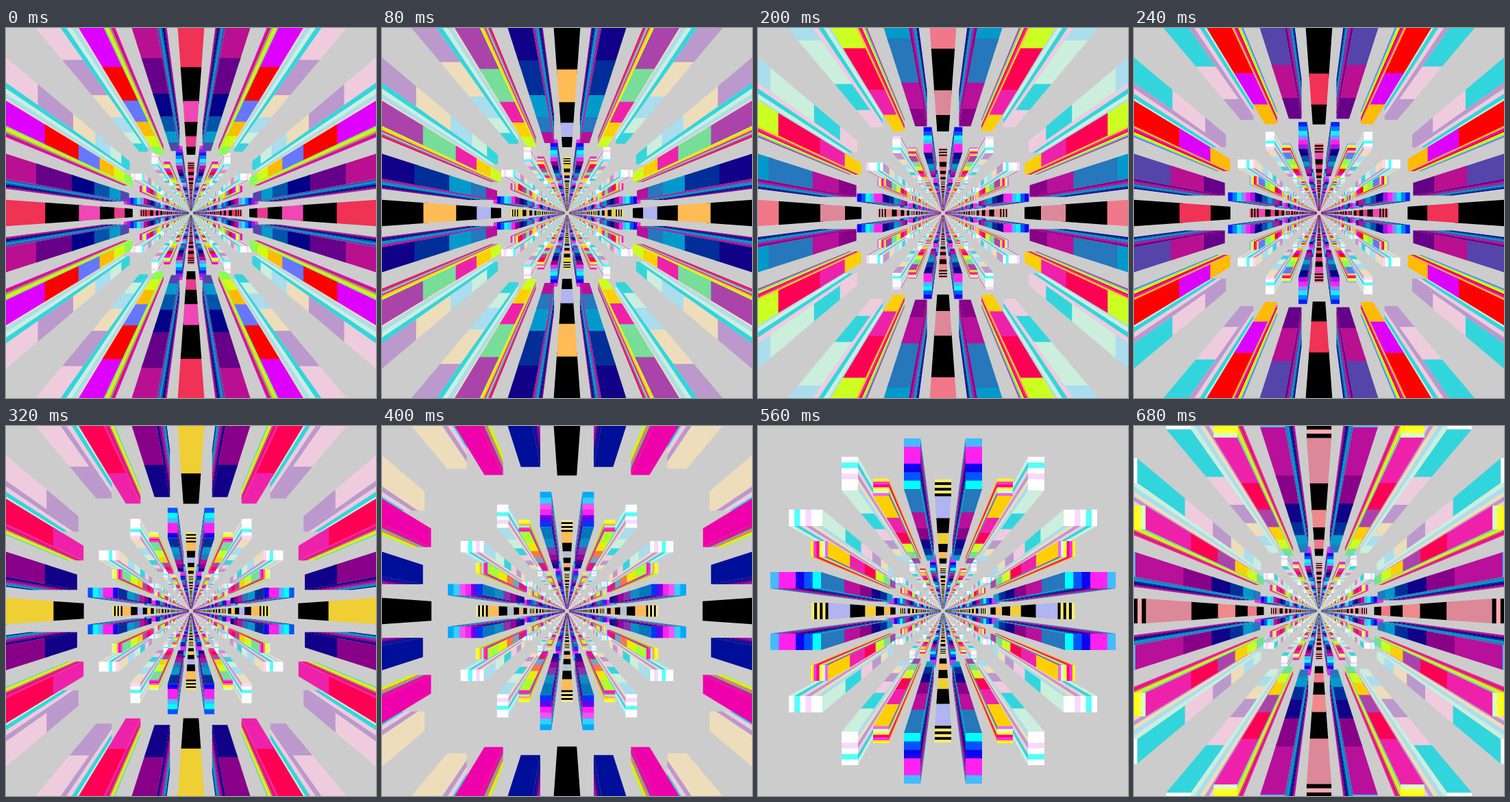
An HTML page with a canvas that plays this animation: 540x540 px, repeating every 720 ms.

```html
<!DOCTYPE html>
<html lang="en">
<head>
<meta charset="utf-8">
<title>Bar tunnel</title>
<style>
  html, body { margin: 0; width: 100%; height: 100%; overflow: hidden; background: #ccc; }
  canvas { display: block; width: 540px; height: 540px; }
</style>
</head>
<body>
<canvas id="stage" width="540" height="540"></canvas>
<script>
const ctx = document.getElementById('stage').getContext('2d');

const STEP = 40, STEPS = 18;   // ms per step, steps per loop
const PERIOD = 2.02;           // depth between rings
const CELL = 0.2363;           // depth of one colour cell
const RINGS = 26;
const NEAR = 0.2;
const LAP = 0.1;               // share by which pieces run under the next one

const list = s => s.split(' ').map(c => '#' + c);
const LINEAR = [0, 3, 6, 9, 12, 15];
const SWAPPED = [0, 3, 6, 15, 12, 9];

// r, R: inner and outer radius; a, b: inner and outer lateral offset
const bars = [
  {
    r: 176, R: 225, a: 124, b: 148, order: LINEAR,
    body: list('eeccdd bb99cc eeddbb aaddee cceedd 33d5dd'),
    cap: list('ffffff f8d8fc ffffff ffffff ffffff 55ffff')
  },
  {
    r: 168, R: 193, a: 79, b: 102, order: SWAPPED,
    body: list('dd00ff ee00aa ff0055 ff0000 d0226a aa44aa 6677ff 66aacc 77dd99 ' +
               '88ff55 aaff33 ccff22 d0ff11 ecec00 fcd000 ffbb00 ff7744 ee22aa'),
    cap: list('ff00ff ff00dd ff0088 ff0033 ff3388 ee66ee 99aaff 99eeee d8ffc8 ' +
              'c8ff77 f0ff44 ffff33 ffff11 ffff00 ffff00 ffee00 ffaa55 ff33dd')
  },
  {
    r: 178, R: 252, a: 33, b: 57, order: LINEAR,
    body: list('b81090 990099 880088 660088 440088 110088 000088 000f99 002e99 ' +
               '0055aa 0077bb 0099cc 0099cc 118bc4 2677bb 5544aa 8833aa b8109a'),
    cap: list('ff22ee ff22ee ff22ee aa11ee 6600ee 1100ee 0022f4 0033fa 0055ff ' +
              '0080ff 00aaff 00ffff 11eeff 33d0ff 44bbff 8888ff ee55f4 ff22ee')
  },
  {
    r: 167.5, R: 192, a: -12, b: 12, order: LINEAR, central: true,
    body: list('f03255 f0863c efcf33 efc060 efae70 ee8a8a f047b4 f58078 ffbb55 ' +
               'fca860 ffbb55 f07888 e63c8c d080c8 b0b4f0 b0b8e0 b4c0d0 dd8899'),
    cap: list('ff5577 ff9966 ffee66 ffe070 ffee99 ffaab0 '.repeat(3).trim())
  }
];

function shade(bar, palette, n, k) {
  if (bar.central && k % 2) return '#000';
  const m = (n + bar.order[k]) % STEPS;
  return palette[Math.floor(m * palette.length / STEPS)];
}

// Points are [lateral, radial, depth] triples
function quad(color, ...points) {
  ctx.fillStyle = color;
  ctx.beginPath();
  for (const [x, y, z] of points) ctx.lineTo(x / z, -y / z);
  ctx.fill();
}

function drawBar(bar, n, front) {
  const { r, R, a, b } = bar;
  const end = front + 6 * CELL;
  const start = Math.max(front, NEAR);
  const stripe = (R - r) / 6;

  for (let k = 0; k < 6; k++) {
    const color = shade(bar, bar.body, n, k);
    const z0 = Math.max(front + k * CELL, NEAR);
    const z1 = Math.min(front + (k + 1 + LAP) * CELL, end);
    if (z1 > z0) quad(color, [a, r, z0], [b, r, z0], [b, r, z1], [a, r, z1]);
    if (!bar.central) {
      const y0 = R - k * stripe;
      const y1 = Math.max(y0 - stripe * (1 + LAP), r);
      quad(color, [a, y0, start], [a, y1, start], [a, y1, end], [a, y0, end]);
    }
  }
  if (front < NEAR) return;
  for (let k = 0; k < 6; k++) {
    const y0 = R - k * stripe;
    const y1 = Math.max(y0 - stripe * (1 + LAP), r);
    quad(shade(bar, bar.cap, n, k),
      [a, y0, front], [b, y0, front], [b, y1, front], [a, y1, front]);
  }
}

function draw(n) {
  ctx.setTransform(1, 0, 0, 1, 0, 0);
  ctx.fillStyle = '#ccc';
  ctx.fillRect(0, 0, 540, 540);
  for (let ring = RINGS; ring >= -1; ring--) {
    const front = 1 + PERIOD * ((14 - n) / STEPS + ring);
    if (front + 6 * CELL <= NEAR) continue;
    for (const bar of bars) {
      for (let turn = 0; turn < 4; turn++) {
        for (const flip of bar.central ? [1] : [1, -1]) {
          const c = [1, 0, -1, 0][turn], s = [0, 1, 0, -1][turn];
          ctx.setTransform(c * flip, s * flip, -s, c, 270, 270);
          drawBar(bar, n, front);
        }
      }
    }
  }
}

let shown = -1;
function tick() {
  const n = Math.floor(performance.now() / STEP) % STEPS;
  if (n !== shown) draw(shown = n);
  requestAnimationFrame(tick);
}
tick();
</script>
</body>
</html>
```
